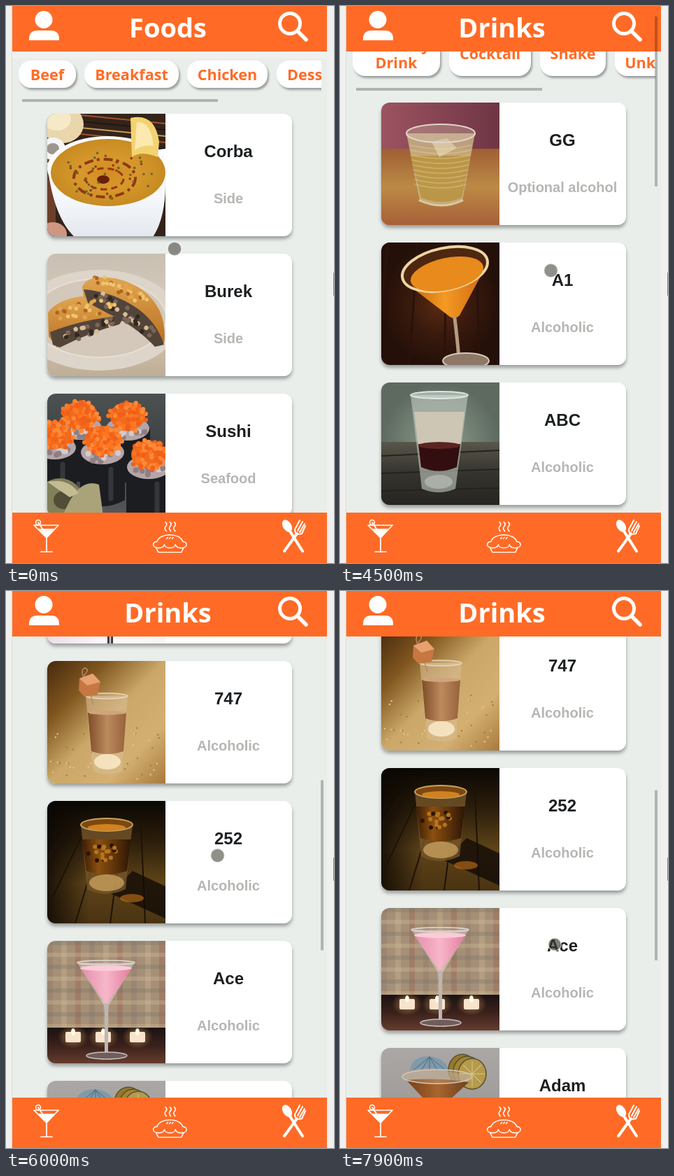
These frames come from a looping animation (469 by 796 pixels, 8000 ms). An HTML page:

```html
<!DOCTYPE html>
<html lang="en">
<head>
<meta charset="utf-8">
<title>Foods and drinks</title>
<style>
  html, body { margin: 0; height: 100%; overflow: hidden; background: #f0f0ee; }
  svg { display: block; }
  text { text-anchor: middle; font: bold 24px "Liberation Sans", Arial, sans-serif; fill: #1c1f21; }
  text.kind { font-size: 20px; fill: #b4b7b2; }
  text.pill { font: bold 21.6px "Open Sans", "Noto Sans", sans-serif; fill: #ff6b26; }
  text.title { font: bold 38px "Open Sans", "Noto Sans", sans-serif; fill: #fff; }
  .card { filter: drop-shadow(0 4px 2.5px #0005); }
  .chip { filter: drop-shadow(2px 3px 1.5px #0005); }
</style>
</head>
<body>
<svg id="stage" width="469" height="796"></svg>
<script>
const rect = (x, y, w, h, fill, more = '') => `<rect x="${x}" y="${y}" width="${w}" height="${h}" fill="${fill}" ${more}/>`;
const oval = (x, y, rx, ry, fill, more = '') => `<ellipse cx="${x}" cy="${y}" rx="${rx}" ry="${ry}" fill="${fill}" ${more}/>`;
const shape = (d, fill) => `<path d="${d}" fill="${fill}"/>`;
const line = (d, color, width, more = '') =>
  `<path d="${d}" fill="none" stroke="${color}" stroke-width="${width}" stroke-linecap="round" stroke-linejoin="round" ${more}/>`;
const text = (x, y, s, cls = '') => `<text x="${x}" y="${y}" class="${cls}">${s}</text>`;
const ring = (color, width = 2) => `stroke="${color}" stroke-width="${width}"`;
const times = (n, f) => Array.from({ length: n }, (_, i) => f(i)).join('');

let seed = 7;
const random = () => (seed = seed * 16807 % 2147483647) / 2147483647;
const speckle = (n, x, y, rx, ry, colors, size) => times(n, () => {
  const a = random() * 6.283, r = Math.sqrt(random());
  return oval(x + rx * r * Math.cos(a), y + ry * r * Math.sin(a), size, size, colors[random() * colors.length | 0]);
});
const crumbs = (n, x, y, rx, ry, tilt, colors, size) =>
  `<g transform="rotate(${tilt} ${x} ${y})">${speckle(n, x, y, rx, ry, colors, size)}</g>`;

let defs = '<clipPath id="round"><rect width="350" height="175" rx="12"/></clipPath>' +
  '<clipPath id="strip"><rect x="9" y="60" width="442" height="110"/></clipPath>';
const gradient = (kind, id, attrs, ...colors) => {
  defs += `<${kind}Gradient id="${id}" ${attrs}>` + colors.map((c, i) =>
    `<stop offset="${i / (colors.length - 1)}" stop-color="${c}"/>`).join('') + `</${kind}Gradient>`;
  return `url(#${id})`;
};
const down = (id, ...colors) => gradient('linear', id, 'x2="0" y2="1"', ...colors);
const across = (id, ...colors) => gradient('linear', id, '', ...colors);
const diagonal = (id, ...colors) => gradient('linear', id, 'y2="1"', ...colors);
const glow = (id, ...colors) => gradient('radial', id, '', ...colors);
const back = fill => rect(0, 0, 169, 175, fill);

const sushi = (x, y) => shape(`M${x - 32} ${y} V${y + 68} Q${x} ${y + 86} ${x + 32} ${y + 68} V${y}Z`, '#1c1d20') +
  line(`M${x + 12} ${y + 24} V${y + 66}`, '#34363a', 7) +
  oval(x, y, 31, 17, '#b3a5a8') + speckle(14, x, y + 4, 25, 11, ['#d6cbcb', '#8d7f82'], 4) +
  oval(x, y - 18, 25, 20, '#f26a1b') + speckle(70, x, y - 17, 28, 22, ['#ff7622', '#f0601a', '#ff8a38'], 3.2);

const candle = x => oval(x, 137, 22, 17, glow('candle' + x, '#ffdf9a88', '#ffb05000')) +
  rect(x - 11, 130, 22, 15, '#f8e3cc', 'rx="2"') + oval(x, 130, 3, 5, '#fffbe4');

const photos = {
  Corba: () => back('#35231a') +
    times(5, i => line(`M48 ${i * 9 + 2} L169 ${i * 9 + 14}`, ['#a0522a', '#1d1815', '#c29a5a'][i % 3], 2)) +
    oval(22, 15, 30, 27, '#e9d6ab') + oval(14, 8, 20, 16, '#f5e9c8') +
    rect(0, 60, 12, 115, '#6d3f2a') + oval(8, 50, 18, 16, '#f4f5f8') + oval(8, 50, 9, 8, '#9d968f') +
    shape('M0 70 C6 130 24 175 60 190 H140 C160 170 169 140 169 100 V50Z', down('bowl', '#fff', '#f6f8fc', '#dfe4ea')) +
    oval(86, 78, 86, 46, '#fafbfd') + oval(87, 84, 82, 48, glow('soup', '#d38c22', '#d6982c', '#c78b22')) +
    oval(82, 92, 44, 27, 'none', ring('#8d3a12', 4) + ' stroke-dasharray="13 5 4 6"') +
    oval(82, 93, 27, 15, 'none', ring('#98390f', 3) + ' stroke-dasharray="9 6"') + oval(80, 94, 9, 6, '#6a1f0b') +
    speckle(40, 86, 86, 66, 37, ['#75642a', '#8f3b12', '#68602e'], 1.8) +
    shape('M119 6 Q154 -2 160 40 L158 62 Q134 52 121 62Z', '#f2d370') + shape('M128 12 Q148 10 152 46 Q136 44 125 52Z', '#fbe9b0') +
    oval(8, 172, 20, 17, '#cf9683'),
  Burek: () => back(down('cloth', '#c9bfb2', '#d8cdbd', '#bfae96')) +
    oval(74, 95, 116, 72, '#ddd5c9') + oval(74, 92, 96, 56, '#d3c8b9') + oval(74, 92, 96, 56, 'none', ring('#e6dfd5', 2)) +
    shape('M1 84 Q14 66 48 61 L98 66 L112 90 Q60 98 14 134 L2 118Z', down('crust', '#e0a552', '#b9701f')) +
    shape('M4 112 Q52 93 112 88 L103 101 Q62 112 18 134 L8 130Z', '#53443a') +
    crumbs(28, 58, 109, 44, 8, -20, ['#d8bc95', '#33281f', '#7a6657'], 3.2) +
    shape('M50 47 Q58 29 96 35 Q142 44 161 82 Q170 104 167 128 Q140 102 103 80 L52 62Z', 'url(#crust)') +
    shape('M52 51 Q94 54 130 79 Q157 99 167 130 L154 133 Q126 103 88 86 L58 70Z', '#53443a') +
    crumbs(32, 113, 87, 58, 9, 35, ['#d8bc95', '#33281f', '#7a6657'], 3.2) +
    crumbs(34, 104, 51, 44, 10, 25, ['#efc46d', '#b0651f', '#e3a44c'], 2.8) +
    crumbs(30, 52, 80, 45, 12, -10, ['#efc46d', '#b0651f', '#e3a44c'], 2.8),
  Sushi: () => back(down('slate', '#4c5152', '#3b3f41', '#55585a')) +
    sushi(47, 49) + sushi(115, 50) + sushi(10, 77) + sushi(79, 84) + sushi(145, 105) +
    oval(18, 150, 32, 29, '#82805a') + oval(24, 152, 15, 13, '#514d36') +
    shape('M22 175 Q44 118 74 130 L80 175Z', '#aaa37a') + shape('M0 126 Q30 120 45 142 L32 148Z', '#c3bb92'),
  GG: () => back(across('wall', '#9c5361', '#6f3544')) + rect(0, 66, 169, 109, down('tan', '#9f5f34', '#bc8a45', '#a85f38')) +
    shape('M36 44 L134 44 L116 140 Q86 154 55 140Z', '#cdb88acc') + shape('M42 76 L128 76 L115 136 Q86 148 57 136Z', '#b8923bcc') +
    times(9, i => line(`M${41 + i} ${61 + i * 7} Q86 ${71 + i * 7} ${129 - i} ${61 + i * 7}`, '#e8d9a466', 1.5)) +
    shape('M72 56 l22 -5 l14 14 l-25 13Z', '#eee3c288') + oval(85, 44, 49, 13, '#d9c9b355', ring('#e2d5c6')) +
    line('M55 140 Q86 154 116 140', '#d8cba4', 3),
  A1: () => back(glow('brown', '#5b2c14', '#3a1a0d', '#241009')) +
    times(4, i => line(`M${i * 50 - 10} 175 L${i * 42 + 10} 0`, '#2a120a', 3)) +
    shape('M29 53 L153 28 L112 104 Q105 111 98 106Z', across('orange', '#c25708', '#f39a24', '#d06410')) +
    oval(91, 38, 62, 30, '#4d2711', ring('#ecd6a2', 4) + ' transform="rotate(-12 91 38)"') +
    oval(94, 45, 53, 23, '#e98a1d', 'transform="rotate(-12 94 45)"') +
    line('M105 108 Q109 140 111 166', '#b59b83', 5) + oval(121, 169, 33, 11, '#8e7767', ring('#d6c8b8')),
  ABC: () => back(glow('moss', '#929d90', '#768477', '#5e6a60')) + rect(0, 85, 169, 90, down('board', '#59564b', '#34332d', '#27251f')) +
    times(3, i => line(`M0 ${105 + i * 25} L169 ${97 + i * 27}`, '#24231f', 2)) +
    shape('M42 18 L124 18 L106 152 Q82 162 58 152Z', '#c4ccc49a') + shape('M47 42 H119 L113 91 H53Z', '#cdc6b4') +
    shape('M53 88 H113 L108 121 Q82 132 57 121Z', '#330e10') + oval(83, 90, 30, 5, '#5b2422') +
    oval(82, 142, 20, 10, '#dbe0d766') + oval(83, 18, 41, 5, '#dbe4df88', ring('#dce5df')),
  Kir: () => back(across('mist', '#eae0e8', '#fbf7fb', '#f5f7f2')) +
    shape('M50 5 L42 74 Q46 124 90 133 Q132 122 134 74 L124 5Z', '#f3edf1') +
    shape('M44 66 H134 Q134 122 90 131 Q45 124 44 66Z', across('kir', '#662007', '#c34b06', '#bc4706', '#1d100e')) +
    oval(89, 67, 45, 2.5, '#3c1a12') + line('M50 5 L43 70 Q45 124 90 133 Q132 122 134 70 L124 5', '#77686d', 1.5) +
    oval(87, 5, 37, 3, '#f8f4f6', ring('#9b9094', 1.5)) + shape('M82 131 H98 L94 142 V175 H86 V142Z', '#3d3236') + line('M90 139 V175', '#c9c0c5', 2.5),
  747: () => back(diagonal('gold', '#46290e', '#80561f', '#cba869', '#d3b072', '#a87a3c')) +
    speckle(60, 84, 130, 110, 44, ['#e2c48a', '#a87a3c'], 1.2) +
    shape('M55 50 H115 L107 157 Q86 167 65 157Z', '#d9bd9199') +
    shape('M58 74 H113 L109 129 Q86 137 63 129Z', across('cream', '#7c4d28', '#bd8a5e', '#96623a')) +
    oval(86, 74, 27, 3, '#cfa47b') + oval(86, 144, 19, 11, '#fff3d5bb') + oval(85, 50, 30, 4, '#ead5b855', ring('#e9d7bb', 1.5)) +
    line('M54 28 Q46 12 54 10 Q61 12 53 20 L66 62', '#b78b62', 1.5) + shape('M46 25 L65 18 L76 30 L72 48 L53 51 L45 42Z', '#c67742') + shape('M46 25 L65 18 L76 30 L57 35Z', '#e6a16e'),
  252: () => back(down('wood', '#0a0703', '#2c1e0b', '#5f4419', '#4a3312')) + rect(0, 0, 60, 175, across('dusk', '#0a0603cc', '#0a060300')) +
    times(5, i => line(`M${i * 50 - 60} 175 L${i * 26 + 30} 36`, '#1e1207', 2)) +
    shape('M90 132 L122 100 L169 122 V168Z', '#120a05cc') + oval(121, 139, 17, 6, '#c8741899') +
    shape('M48 34 L122 34 L112 126 Q84 140 57 126Z', '#75552acc') +
    shape('M50 55 H120 L114 100 Q84 110 56 100Z', across('whiskey', '#3c1c06', '#8a500f', '#5d330a', '#2b1505')) +
    speckle(18, 85, 76, 27, 16, ['#b8741c', '#2a1405'], 3) + oval(85, 117, 25, 12, '#d9ae66aa') +
    oval(85, 34, 37, 9, '#7d480f', ring('#c9a264')) + oval(85, 38, 27, 5, '#cf8220'),
  Ace: () => back('#a68f77') + times(9, i => rect(i * 20, 0, 8, 126, ['#8a796966', '#c7b28d66', '#93574a55'][i % 3])) +
    times(8, i => rect(0, i * 17, 169, 6, ['#76746b55', '#d0bd9855'][i % 2])) +
    rect(0, 124, 169, 51, down('desk', '#1a1213', '#3a211b', '#663c2e')) + candle(37) + candle(80) + candle(129) +
    shape('M43 31 H125 L88 92 H81Z', '#e8dcd877') + shape('M47 39 H121 L88 86 Q84 92 81 86Z', across('pink', '#e48dab', '#f7b7c9', '#e27c9f')) +
    oval(84, 39, 37, 4, '#fbcbd6') + oval(84, 31, 41, 3, 'none', ring('#e2dad7', 1.5)) +
    shape('M81 90 H88 L87 102 V160 H82 V102Z', '#bfb5b4') + oval(85, 164, 29, 5, '#6f5d5b', ring('#c9bfbe', 1.5)),
  Adam: () => back(down('grey', '#aaa7a5', '#938e8a')) + shape('M0 104 L169 72 V175 H0Z', across('table', '#79502c', '#9a6634', '#7f4d21')) +
    oval(84, 111, 31, 18, '#51372999') + shape('M49 108 L137 116 L143 175 H21Z', '#d9d5cf') +
    shape('M41 32 Q43 12 69 12 Q92 14 97 34 Q70 25 41 32Z', '#7f9aaa') + times(5, i => line(`M69 13 L${47 + i * 11} 31`, '#4f6b7e', 1)) +
    times(3, i => oval(116 + i * 7, 31 + i * 3, 20, 22, ['#94782b', '#a38535', '#b59a4c'][i], ring('#5b5030', 1.5))) +
    times(8, i => `<path d="M130 37 v-18" stroke="#d8c98c" transform="rotate(${i * 45} 130 37)"/>`) +
    shape('M29 35 Q78 25 131 42 L84 90 Q79 94 74 90Z', '#b4a18c99') + shape('M36 46 Q80 42 125 49 L83 88 Q79 92 75 88Z', across('amber', '#754018', '#a8652f', '#6f4120')) +
    oval(80, 41, 50, 10, '#d0bda044', ring('#d2c7b6', 1.5)) + line('M79 92 L78 140', '#c5bcb0', 4) + oval(78, 149, 21, 16, '#cac4bb99', ring('#eae6df', 1.5))
};

const card = (name, kind, y) => `<g transform="translate(59 ${y})">` +
  rect(0, 0, 350, 175, '#fff', 'rx="12" class="card"') +
  `<g clip-path="url(#round)"><svg width="169" height="175">${photos[name]()}</svg></g>` +
  text(259, 62, name) + text(259, 128, kind, 'kind') + '</g>';

const chip = (x, width, height, ...lines) => rect(x, 78, width, height, '#fff', 'rx="18" class="chip"') +
  lines.map((s, i) => text(x + width / 2, 78 + height / 2 + 8 + (i - (lines.length - 1) / 2) * 25, s, 'pill')).join('');
const strip = (chips, barY, barWidth) => rect(9, 65, 450, 10, '#f0f0ee') +
  `<g clip-path="url(#strip)">${chips}</g>` + rect(23, barY, barWidth, 4, '#0000003f');
const foodStrip = strip(chip(18, 82, 39, 'Beef') + chip(112, 135, 39, 'Breakfast') +
  chip(259, 115, 39, 'Chicken') + chip(387, 112, 39, 'Dessert'), 133, 280);
const drinkStrip = strip(chip(18, 125, 64, 'Ordinary', 'Drink') + chip(156, 117, 64, 'Cocktail') +
  chip(286, 94, 64, 'Shake') + chip(393, 132, 64, 'Other /', 'Unknown'), 159, 266);

const steamPath = 'M202 322 C217 334 215 345 206 354 C195 365 199 374 212 390';
const pie = (dough, steam, width, steamWidth) =>
  times(3, i => `<path d="${steamPath}" transform="translate(${i * 31} 0)" fill="none" stroke="${steam}" stroke-width="${steamWidth}"/>`) +
  line('M145 461 C128 460 119 470 119 482 C119 510 190 515 197 480 C199 513 272 513 274 480 C281 515 352 510 352 482 C352 470 343 460 326 461 C305 397 165 397 145 461Z', dough, width) +
  line('M139 504 L155 535 H316 L331 504', dough, width) +
  times(3, i => line(`M${213 + i * 19} 440 l8 -10`, dough, width));

const header = rect(9, 0, 450, 65, '#ff6b26') +
  oval(54, 19.5, 12.5, 12.5, '#fff') + shape('M33 49 V47 Q33 35 45 35 H64 Q76 35 76 47 V49Z', '#fff') +
  oval(406, 25, 14.5, 14.5, 'none', ring('#fff', 5)) + line('M417 36 L429 48', '#fff', 5.5);

const nav = rect(9, 724, 450, 72, '#ff6b26') +
  line('M40 742 H75 L58 760Z M58 760 V779 M50 780 H66 M46 738 L54 750', '#fff', 1.7) +
  shape('M46 747 H70 L58 760Z', '#fff') + oval(46, 738, 3.5, 3.5, 'none', ring('#fff', 1.5)) +
  `<g transform="translate(186.3 671.5) scale(.204)">${pie('#fff', '#fff', 7, 8)}</g>` +
  oval(402, 743, 6, 9.5, '#fff', 'transform="rotate(-32 402 743)"') + line('M405 749 L424 779', '#fff', 4) +
  line('M416 754 L398 779', '#fff', 4) + line('M413 748 Q413 757 423 754 L428 743 M413 748 L420 735 M417 750 L424 737 M420 752 L427 740', '#fff', 2);

const drinkNames = ['GG', 'A1', 'ABC', 'Kir', '747', '252', 'Ace', 'Adam'];
const foods = foodStrip + card('Corba', 'Side', 154) + card('Burek', 'Side', 354) + card('Sushi', 'Seafood', 554);
const drinks = drinkStrip + drinkNames.map((n, i) => card(n, i ? 'Alcoholic' : 'Optional alcohol', 180 + i * 200)).join('');

const stage = document.getElementById('stage');
stage.innerHTML = `<defs>${defs}</defs>` + rect(0, 0, 469, 796, '#f0f0ee') + rect(8, 0, 1, 796, '#dcdedc') +
  rect(468, 381, 1, 33, '#858585') + rect(9, 65, 450, 731, '#e9eeeb') +
  `<g id="foods">${foods}</g><g id="drinks">${drinks}</g>` +
  `<g id="loading">${rect(9, 155, 450, 641, '#f0f0ee')}${foodStrip}<g id="pie">${pie('#e85d04', '#ff6b26', 6, 9)}</g></g>` +
  header + text(231.5, 45, '', 'title') + `<g id="nav">${nav}</g>` +
  `<g id="bars">${rect(450, 2, 4, 243, '#0000003f', 'id="thumb"')}${rect(14, 788, 383, 4, '#0000003f', 'id="bottom"')}</g>` +
  oval(0, 0, 10, 10, '#46463c99', 'id="cursor" stroke="#ffffff99" stroke-width="1.8"');

const $ = id => document.getElementById(id);
const title = document.querySelector('.title');
const show = (id, on) => $(id).setAttribute('display', on ? 'inline' : 'none');

// Each key is [time, ...values]; values are interpolated between keys.
function track(keys, t, ease = u => u) {
  const next = keys.findIndex(k => k[0] > t);
  if (next < 0) return keys.at(-1).slice(1);
  if (!next) return keys[0].slice(1);
  const a = keys[next - 1], b = keys[next], u = ease((t - a[0]) / (b[0] - a[0]));
  return a.slice(1).map((v, i) => v + (b[i + 1] - v) * u);
}
const smooth = u => u * u * (3 - 2 * u);

const cursorKeys = [[300, 241, 347], [500, 245, 301], [900, 95, 714], [1200, 219, 562], [1800, 78, 706],
  [2100, 58.5, 752], [3400, 58.5, 752], [4100, 301.5, 378], [4700, 301.5, 378], [5600, 302.5, 378],
  [6300, 302.5, 378], [6600, 301, 381], [7100, 301, 381], [7900, 307, 505]];
const scrollKeys = [[4200, 0], [4500, 42], [4600, 66], [4700, 66], [4900, 165], [5600, 662], [6000, 880],
  [6300, 880], [6600, 1045], [6800, 1051], [7100, 1051], [7900, 927]];
const barKeys = [[2499, 0], [2500, 1], [2800, 1], [3000, .33], [3200, 0], [3299, 0], [3300, 1], [3800, 1], [4100, 0], [4200, 0], [4300, 1]];

function draw(now) {
  const t = Math.floor(now % 8000 / 100) * 100;
  const loading = t >= 2500 && t < 3300, pressed = t >= 2200 && t < 2500 || t >= 7200;
  const [scroll] = track(scrollKeys, t), [x, y] = track(cursorKeys, t, smooth);
  show('foods', t < 2500);
  show('loading', loading);
  show('pie', t >= 2700);
  show('drinks', t >= 3300);
  show('nav', !loading);
  show('bottom', loading);
  title.textContent = t < 2500 ? 'Foods' : 'Drinks';
  $('drinks').setAttribute('transform', `translate(0 ${-scroll})`);
  $('bars').setAttribute('opacity', track(barKeys, t)[0]);
  $('thumb').setAttribute('y', 2 + scroll * .305);
  $('thumb').setAttribute('height', loading ? 693 : 243);
  $('cursor').setAttribute('transform', `translate(${x} ${y}) scale(${pressed ? .92 : 1})`);
  $('cursor').setAttribute('fill', pressed ? '#3c3c34a8' : '#46463c99');
  requestAnimationFrame(draw);
}
requestAnimationFrame(draw);
</script>
</body>
</html>
```
